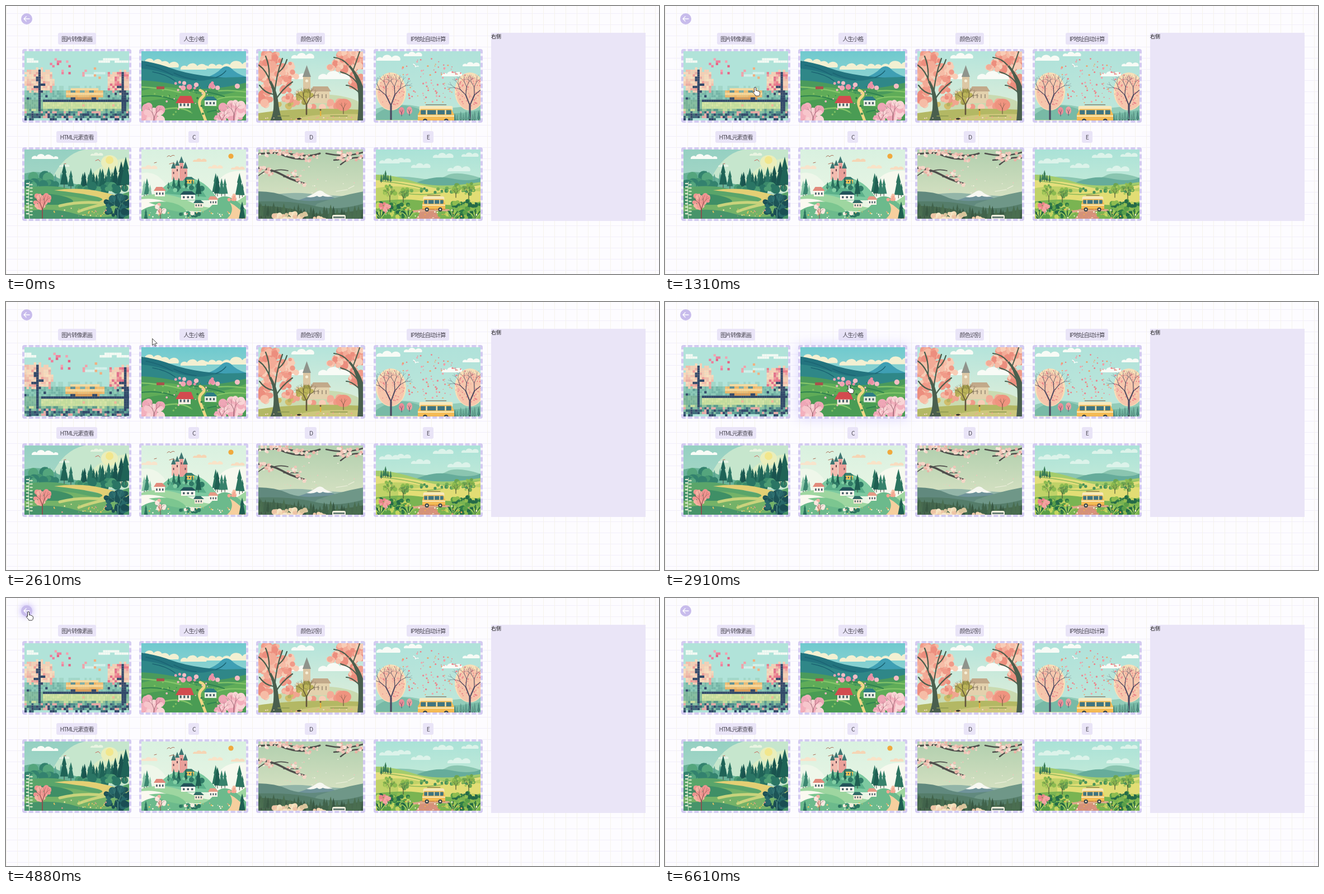
Animation of 1167 by 480 pixels, one loop 6650 ms. Source, as an HTML page:

```html
<!DOCTYPE html>
<html lang="zh">
<head>
<meta charset="utf-8">
<style>
html, body { margin: 0; width: 100%; height: 100%; overflow: hidden; }
#stage {
  position: absolute; left: 0; top: 0; width: 1167px; height: 480px; overflow: hidden;
  background-color: #fdfcff;
  background-image:
    linear-gradient(90deg, #f5f3ec 1px, transparent 1px),
    linear-gradient(#f1eefa 1px, transparent 1px);
  background-size: 20px 20px;
  background-position: 0 13px;
  font-family: "Noto Sans CJK SC", "Noto Sans", sans-serif;
}
#stage > * { position: absolute; }
.tag {
  height: 21px; line-height: 21px; border-radius: 3px; background: #e9e4f7;
  color: #4d4a55; font-size: 10.4px; letter-spacing: -1.2px; text-align: center; white-space: nowrap;
}
.card {
  box-sizing: border-box; width: 195px; height: 132px; overflow: hidden;
  border: 4px dashed #d3cbf1; border-radius: 4px; background: #f6f3fd;
}
.card svg { display: block; width: 187px; height: 124px; }
#panel { left: 867px; top: 48px; width: 276px; height: 337px; background: #eae5f7; color: #111; font-size: 9px; line-height: 13px; }
#back { left: 27px; top: 13px; width: 20px; height: 20px; border-radius: 50%; background: #c8bcec; }
#mouse { left: 0; top: 0; }
</style>
</head>
<body>
<div id="stage">
  <div id="back"><svg width="20" height="20" style="display:block"><path d="M15.5 10H5m4.5-4.5L5 10l4.5 4.5" fill="none" stroke="#fff" stroke-width="1.3"/></svg></div>
  <div id="panel">右侧</div>
</div>
<script>
const LOOP = 6650;
const stage = document.getElementById('stage');
const back = document.getElementById('back');

let seed = 7, out = '', ids = 0;
const rnd = () => (seed = (seed * 16807) % 2147483647) / 2147483647;
const pick = a => a[Math.floor(rnd() * a.length)];
const n1 = v => +v.toFixed(1);

// drawing helpers
const P = (d, f) => out += `<path d="${d}" fill="${f}"/>`;
const L = (d, s, w = 1) => out += `<path d="${d}" fill="none" stroke="${s}" stroke-width="${n1(w)}" stroke-linecap="round"/>`;
const E = (x, y, r, f, ry = r) => out += `<ellipse cx="${n1(x)}" cy="${n1(y)}" rx="${n1(r)}" ry="${n1(ry)}" fill="${f}"/>`;
const R = (x, y, w, h, f, r = 0) => out += `<rect x="${n1(x)}" y="${n1(y)}" width="${n1(w)}" height="${n1(h)}" rx="${r}" fill="${f}"/>`;
const sky = (x, y, a, b) => {
  const id = 'sky' + ids++;
  out += `<linearGradient id="${id}" x2="0" y2="1"><stop stop-color="${a}"/><stop offset="1" stop-color="${b}"/></linearGradient>`;
  R(x, y, 188, 125, `url(#${id})`);
};
const cloud = (x, y, w, f = '#f8fbf6') => {
  const a = (rx, ry, dx, dy) => `a${n1(rx * w)} ${n1(ry * w)} 0 0 1 ${n1(dx * w)} ${n1(dy * w)}`;
  P(`M${x - w / 2} ${y}${a(.15, .13, .25, -.12)}${a(.22, .2, .4, -.02)}${a(.18, .14, .35, .14)}z`, f);
};
const spray = (n, x, y, rx, ry, r, cols) => {
  while (n--) {
    const a = rnd() * 6.283, d = Math.sqrt(rnd());
    E(x + Math.cos(a) * d * rx, y + Math.sin(a) * d * ry, r * (.6 + rnd() * .8), pick(cols));
  }
};
const pine = (x, y, h, f) => {
  P(`M${n1(x)} ${n1(y - h)}l${n1(h * .1)} ${n1(h * .4)}h${n1(-h * .03)}l${n1(h * .1)} ${n1(h * .5)}h${n1(-h * .34)}l${n1(h * .1)} ${n1(-h * .5)}h${n1(-h * .03)}z`, f);
  R(x - .5, y - h * .12, 1, h * .16, '#3c4a40');
};
const pines = (n, x0, x1, y, h, cols) => {
  for (let i = 0; i < n; i++) pine(x0 + (x1 - x0) * (i + rnd() * .6) / n, y + rnd() * 4, h * (.65 + rnd() * .6), pick(cols));
};
const grow = (x, y, len, ang, w, c, n) => {
  const x2 = x + len * Math.sin(ang), y2 = y - len * Math.cos(ang);
  L(`M${n1(x)} ${n1(y)}L${n1(x2)} ${n1(y2)}`, c, w);
  if (n) for (const s of [-.45, .4]) grow(x2, y2, len * .72, ang + s + rnd() * .2 - .1, w * .62, c, n - 1);
};
const tree = (x, y, r, f, c, ry = r) => {
  E(x, y, r, f, ry);
  grow(x, y + ry * 1.3, ry * .75, 0, .9, c, 2);
};
const house = (x, y, w, h, wall, roof) => {
  R(x, y - h, w, h, wall);
  P(`M${x - 2} ${y - h}l${w * .25} ${-h * .7}h${w * .6}l${w * .15 + 4} ${h * .7}z`, roof);
  for (let i = 0; i < 3; i++) R(x + w * (.12 + i * .3), y - h * .7, w * .14, h * .4, '#49606a');
};
const van = (x, y, w, h) => {
  R(x + w * .04, y - h, w * .92, h * .3, '#f7e8bd', 3);
  P(`M${x} ${y - h * .1}v${-h * .38}l${w * .08} ${-h * .34}h${w * .84}l${w * .08} ${h * .34}v${h * .38}z`, '#f4bb55');
  R(x + w * .08, y - h * .75, w * .84, h * .26, '#3f7480', 1);
  for (const k of [.22, .5, .74]) R(x + w * k, y - h * .76, w * .04, h * .28, '#f8dfa0');
  R(x, y - h * .44, w, h * .08, '#fae9b6');
  R(x, y - h * .14, w, h * .05, '#c87b3a');
  for (const k of [.2, .78]) { E(x + w * k, y - h * .1, h * .14, '#33434b'); E(x + w * k, y - h * .1, h * .06, '#e8dcc0'); }
  L(`M${x + w * .22} ${y - h * 1.07}h${w * .56}`, '#6b5844', 1);
};

// square-cell helpers for the first picture
const U = 4.13;
const cell = (i, j, f) => R(33 + i * U, 81 + j * U, U + .1, U + .1, f);
const px = (i, j, w, h, cols, p = 1) => {
  for (let a = 0; a < w; a++) for (let b = 0; b < h; b++) if (rnd() < p) cell(i + a, j + b, pick(cols));
};
const oval = (cx, cy, rx, ry, cols) => {
  for (let i = 0; i < 46; i++) for (let j = 0; j < 30; j++) {
    if (((i - cx) / rx) ** 2 + ((j - cy) / ry) ** 2 < .75 + rnd() * .4) cell(i, j, pick(cols));
  }
};

const pixelPark = () => {
  const navy = '#33496a', white = ['#f4faf4'];
  const peach = ['#f6ceb4', '#f6ceb4', '#f9d9bb', '#f3bcaa'];
  R(33, 81, 188, 125, '#b1e3d9');
  px(1, 3, 3, 1, white); px(1, 4, 5, 1, white); px(34, 3, 7, 1, white); px(39, 4, 6, 1, white); px(32, 4, 5, 1, white);
  px(30, 9, 5, 1, ['#d3f0ea']); px(26, 10, 5, 1, ['#d3f0ea']);
  px(12, 15, 22, 2, ['#a2d6c8', '#b1e3d9']); px(0, 17, 46, 4, ['#80c0ae', '#8cc9b7', '#74b4a6']);
  oval(5.5, 12.5, 7, 5.5, peach); oval(41, 13, 6, 5.5, peach);
  px(0, 9, 12, 9, ['#ef9c98', '#f8e0c0', '#e8aca2'], .18); px(36, 9, 9, 9, ['#ea7d8a', '#f09aa0', '#e2708a'], .34);
  px(11, 2, 10, 8, ['#ee7f9c', '#f3a1b0', '#e56485'], .12); px(20, 7, 13, 6, ['#f2a0a8', '#f0b080'], .05);
  px(0, 17, 12, 4, ['#5f9c94', navy, '#8ecbb4'], .28); px(35, 17, 11, 4, ['#5f9c94', navy, '#8ecbb4'], .28);
  px(0, 21, 46, 5, ['#86bd9e', '#79b298']);
  px(8, 21, 37, 1, [navy]);
  px(8, 22, 35, 3, ['#cde0a0', '#cde0a0', '#d6e4a6', '#c4dc9c']);
  px(14, 23, 26, 1, ['#f0b89a', '#b6d49c'], .15);
  px(0, 25, 46, 1, ['#5a9a8c', '#93c298', '#cde0a0']);
  px(0, 26, 46, 3, ['#4e8a8a', '#5fa394', '#84bea0', '#3c647a', '#e9a8a4']);
  px(0, 27, 46, 3, [navy, navy, '#3d6c78'], .45);
  px(20, 16, 12, 1, ['#f4d9a0']); px(18, 17, 16, 3, ['#f0b566', '#f2be74']);
  px(20, 17, 2, 1, ['#5d8f96']); px(24, 17, 2, 1, ['#7eb0ac']); px(28, 17, 2, 1, ['#5d8f96']);
  px(18, 18, 16, 1, ['#f7d79a']); px(20, 20, 12, 1, ['#d99a58']); px(20, 20, 2, 1, [navy]); px(29, 20, 2, 1, [navy]);
  px(6, 8, 1, 18, [navy]); px(5, 11, 1, 2, [navy]); px(7, 14, 2, 1, [navy]); px(4, 15, 2, 1, [navy]);
  px(42, 9, 1, 18, [navy]); px(43, 18, 1, 8, [navy]); px(40, 15, 2, 1, [navy]);
};

const valley = () => {
  sky(242, 81, '#6fc9ce', '#b9e2d6');
  for (const [x, y, w] of [[258, 104, 40], [285, 110, 46], [335, 114, 46], [370, 112, 34], [414, 112, 56]]) cloud(x, y, w, '#f3f0d2');
  P('M352 130q22-6 34-19q8-6 16 0q10 11 28 16v18z', '#3f9fb4');
  P('M242 98q28 4 52 13t60 14t76 2v50H242z', '#23747f');
  P('M242 112q26 2 60 14t60 6t68-4v40H242z', '#2f8788');
  L('M250 106q24 4 48 18M300 120q20 10 40 12M375 128q12-4 18-12M262 118q24 4 40 16', '#1b6473', 1.4);
  P('M242 133q40 2 78 12t110-8v70H242z', '#4a9a5c');
  P('M242 152q48-14 90 2t98-8v60H242z', '#5fac58');
  P('M242 174q50-16 100 0t88-6v38H242z', '#4a9c54');
  L('M242 145q40 2 70 10M380 152q24-2 50 2M280 186q30-8 50 4M375 168q20-8 55-4', '#83c468', 2.4);
  L('M242 162q30-4 58 6M330 150q30 2 60 12M360 190q20-6 30-2', '#2f8250', 2);
  L('M347 151q12 5 4 12t-4 17t10 26', '#f0d684', 5);
  spray(14, 335, 143, 92, 7, 3.5, ['#f0a4b4', '#e890a6', '#f5bcc4']);
  spray(46, 335, 170, 90, 28, 1.5, ['#2f7d4a', '#3b8a4c', '#f3b8c0', '#81bf62']);
  house(308, 183, 22, 12, '#f6efe2', '#d34b4f'); house(355, 179, 21, 10, '#e6eee2', '#2c7c84');
  P('M303 174l8-13h20l5 13z', '#d34b4f');
  R(269, 144, 14, 5, '#a8524c');
  for (const [x, y, r] of [[264, 194, 22], [407, 188, 23], [385, 200, 11]]) {
    spray(34, x, y, r, r * .72, r * .26, ['#f3b0bd', '#f7c6cc', '#eea6b6', '#f9d5d6']);
    grow(x, y + 18, 13, .05, 1.3, '#8d5664', 3);
  }
};

const church = () => {
  const pinks = ['#f09a88', '#f3ab97', '#ec8e7e', '#f6bca6', '#f8cdb6'], bark = '#4a5f4e';
  sky(451, 81, '#b4e4db', '#e6f0da');
  cloud(530, 94, 40); cloud(588, 131, 60); cloud(515, 131, 46);
  E(560, 184, 80, '#c9dab0', 26);
  R(531, 126, 13, 46, '#dcc7a4'); P('M530 127l7.500-21l7.500 21z', '#8f948c'); E(537.5, 134, 2.6, '#f6efd8');
  R(518, 152, 60, 22, '#e3d1ad'); P('M543 153l6-9h26l6 9z', '#c2a98a');
  for (let i = 0; i < 8; i++) R(522 + i * 7, 158, 2, 7, '#a89880');
  spray(12, 585, 178, 46, 6, 6, pinks); spray(9, 507, 176, 20, 5, 5, ['#b3b160', '#d0bd6a', '#f0a58e']);
  P('M451 192q80-12 187-6v20H451z', '#b3b864');
  P('M510 206q30-16 128-12v14z', '#cdc77c');
  E(603, 177, 14, '#ef937f', 11); grow(603, 193, 9, 0, 1.3, '#7d5c48', 2);
  spray(28, 537, 164, 15, 12, 4, ['#aea856', '#bcb45a', '#9c9848']); grow(537, 194, 17, 0, 2.6, '#62543c', 4);
  spray(60, 466, 118, 20, 34, 6, pinks); spray(36, 501, 126, 18, 26, 5, pinks); spray(18, 462, 165, 12, 14, 6, pinks);
  spray(16, 505, 165, 12, 6, 4, pinks); spray(24, 474, 94, 18, 10, 5, pinks);
  spray(70, 615, 98, 26, 20, 6, pinks); spray(14, 586, 108, 12, 8, 4, pinks); spray(18, 628, 138, 12, 16, 6, pinks);
  P('M472 206q8-16 6-40q-1-18-8-30l4-2q10 18 12 34q2 22 8 38z', bark); P('M628 206q4-36 0-62q-4-22-16-36l3-2q16 18 23 38v62z', bark);
  L('M472 136q-6-20-20-30M480 160q2-34 14-66M482 168q12-20 30-32M470 130q2-20-6-40M477 158q-14-2-24-16M488 118q10-8 14-22', bark, 2.2);
  L('M630 142q-10-18-32-24M620 116q6-16 12-34M612 106q-10-12-26-14M632 156q-14-14-24-14', bark, 2);
  R(561, 188, 2.4, 9, '#e4b23e'); E(562, 186, 1.5, '#6b4b3a');
  E(524, 202, 4, '#2e2d2b', 1.6); L('M486 197h20M580 197h30', '#8d9a50', 1.6);
  spray(18, 545, 201, 90, 3, 1, ['#f6d7c0', '#f0a58e']);
};

const petals = () => {
  const bark = '#4b4860';
  sky(660, 81, '#b0e2da', '#bfe7da');
  cloud(682, 98, 42); cloud(726, 90, 32); cloud(796, 126, 36); cloud(830, 108, 30);
  P('M660 184q40-12 76-4t112-4v30H660z', '#92ccb9'); P('M660 194q34-26 76-10t112 2v20H660z', '#78baa6');
  for (const x of [687, 828]) {
    E(x, 153, 27, '#f8dfb8', 34); E(x, 156, 24, '#f6c6ac', 30);
    spray(110, x, 150, 24, 30, 1.1, ['#ee9a94', '#f7d8b4', '#f2a596', '#ea858a']);
    grow(x, 206, 28, 0, 3.2, bark, 5);
  }
  tree(706, 188, 5, '#ec8d98', bark, 7); tree(720, 187, 5, '#f0a0a2', bark, 7);
  pines(9, 798, 846, 204, 18, ['#4c8a80', '#5f9c8c']);
  spray(95, 757, 134, 60, 42, 1.2, ['#ef7f86', '#f0a06a', '#f2a0a8', '#e9858f']);
  L('M727 104q3 1 4 5q3-2 5-1', '#fbfdfa', 1.4);
  van(735, 209, 65, 30); R(660, 204, 75, 2, '#cfdfa4');
};

const woods = () => {
  const dark = ['#1f6357', '#2b7464', '#1a544f'];
  sky(33, 257, '#95d0c2', '#b7dfcb');
  P('M82 310q24-53 74-55h64v80H82z', '#c6e6cd'); P('M136 322q30-46 84-50v60h-84z', '#d9ecc6');
  E(185, 280, 15, '#eaeebb', 13); E(185, 276, 7, '#f2e68c');
  cloud(64, 274, 36); cloud(82, 274, 22); cloud(104, 288, 18, '#e4f1e4'); cloud(162, 268, 22, '#e9f4e2');
  P('M33 300q30-8 60 8t80 14v30H33z', '#68b298');
  pines(9, 36, 112, 316, 18, ['#5ba591', '#4b9683']);
  pines(13, 134, 204, 324, 32, dark);
  spray(24, 62, 316, 32, 11, 8, ['#33826e', '#459672', '#54a57d']); spray(30, 172, 328, 48, 7, 6, ['#2a7564', '#3c8b6c', '#4c9c74']);
  P('M33 326q60-10 100 8t88-2v56H33z', '#5aa56a'); P('M86 330q46-6 86 3t50 14q-30 8-60 4q40-8-76-21z', '#e3cf74');
  P('M33 352q50-20 100-8t88 8v32H33z', '#74b268'); P('M33 340q44-8 74 2t-10 14H33z', '#3f8f66');
  L('M96 358q40-10 84-4q-30 6-50 14', '#c9d37c', 5);
  P('M33 368q50-8 90 4t98 0v14H33z', '#47946a');
  pine(104, 324, 42, dark[0]); pine(116, 326, 32, dark[1]); pine(206, 326, 48, dark[2]); pine(214, 326, 56, dark[0]);
  spray(46, 200, 358, 23, 20, 5, ['#1d5457', '#28686a', '#1a4e54']); grow(200, 384, 17, 0, 1.3, '#5d9c8c', 4);
  spray(40, 65, 350, 14, 14, 3.6, ['#f2a196', '#ee9490', '#f5b3a4']); grow(65, 380, 16, 0, 1.8, '#8c4c4c', 3);
  L('M42 381q-4-30 0-66', '#eaf1d6', .9);
  for (let y = 318; y < 374; y += 6) { E(38.5, y, 3, '#e3eed2', 1.2); E(45, y + 2, 3, '#cfe4c0', 1.2); }
  spray(26, 130, 370, 60, 8, 1, ['#f3c65c', '#f6e5a6', '#ef9c8c']);
  L('M160 277l5-2l3 3M104 283l3-1', '#c9675c', 1);
};

const castle = () => {
  const dark = ['#1f5f52', '#2c7460', '#37826c'];
  sky(242, 257, '#d9f1e0', '#eff7e6');
  P('M360 350q16-50 48-54t24 4v60z', '#f6f9ee'); P('M242 300q30-8 50 30t-10 30h-40z', '#eff7ea');
  cloud(346, 279, 24, '#f6d5b4'); cloud(374, 291, 26, '#f9e3c8'); cloud(256, 292, 28, '#f8e4cc'); cloud(414, 293, 24, '#f8dcc0');
  E(402, 269, 4.6, '#f0a93e');
  P('M262 348q22-36 56-40t62 40z', '#7cc9a0'); P('M284 336q22-24 36-28t38 34z', '#5bb08a');
  for (const [x, y, w, h] of [[296, 291, 7, 20], [303, 286, 6, 26], [310, 281, 7, 32], [317, 291, 7, 20]]) {
    R(x, y, w, h, x > 306 ? '#e9a09a' : '#f3bcb0'); P(`M${x - 1} ${y}l${w / 2 + 1} ${-w * 1.7}l${w / 2 + 1} ${w * 1.7}z`, '#3f7672');
    R(x + w / 2 - 1, y + 6, 2, 4, '#694b55');
  }
  house(320, 318, 16, 7, '#f2c45c', '#3a7f72');
  pines(6, 288, 350, 326, 20, dark); pines(4, 372, 394, 336, 32, dark); pines(2, 416, 428, 340, 36, dark);
  pines(3, 244, 262, 340, 26, ['#8cc8aa', '#3b8670']); spray(14, 318, 325, 36, 6, 4, ['#4b9f80', '#82cfa4', '#2f7a66']);
  P('M242 342q40-14 90 10t98-14v46H242z', '#9ed6a0'); P('M242 346q34-4 62 14t126-4v28H242z', '#fbf9f0');
  P('M242 366q30-18 70-2t60-12t58 14v18H242z', '#6cba8c'); P('M255 352q40-6 60 8t-20 6z', '#7cc690');
  house(266, 341, 18, 10, '#fbf5ea', '#e28a7c'); house(313, 347, 25, 9, '#fdf9f0', '#23535a'); house(337, 361, 15, 8, '#f7e8d6', '#2f6a66'); house(363, 356, 15, 9, '#fbf5ea', '#e59a86');
  P('M394 382q16-14 6-30q20 10 30 30z', '#f6cf9e');
  spray(14, 276, 363, 10, 8, 3, ['#f8e9e0', '#f2b3a6']); grow(276, 381, 8, 0, 1, '#7a4d4a', 3);
  spray(12, 328, 374, 20, 4, 3, ['#2c7460', '#3f8f70', '#f6efe0']); spray(9, 404, 344, 7, 6, 3, ['#f4a792', '#f6c2a8']);
  pine(422, 384, 34, dark[0]); pine(250, 383, 20, dark[1]); pine(344, 340, 32, dark[0]);
  spray(30, 335, 373, 90, 8, 1, ['#f3a090', '#fff6e6', '#f0bd58']);
  L('M288 270q4-4 6 0q4-4 7-2M292 283l6-2l4 2M265 281l4-1', '#ab6a52', 1);
};

const blossom = () => {
  const bark = '#4f4e4c';
  sky(451, 257, '#b1cfae', '#e4e8ca');
  P('M451 342q50-10 90-6t98 6v20H451z', '#93b5a8');
  P('M506 352q34-8 48-18q6-4 12 0q18 12 56 18z', '#6f939a'); P('M537 342q12-5 19-10q5-3 10 0q6 6 18 9q-12 2-18-1q-6 4-10 0q-8 4-19 2z', '#f7f8f2');
  P('M451 332q30 0 52 10t60 6t76-2v38H451z', '#61897e'); P('M556 354q40-14 84-22v40H540z', '#6f9788');
  P('M451 350q60-2 100 8t88-4v28H451z', '#557d6a');
  P('M451 358q40 0 80 10t108-4v20H451z', '#48694f');
  pines(16, 451, 530, 376, 24, ['#41634b', '#4a6e50', '#395843']); pines(18, 530, 640, 382, 22, ['#41634b', '#4a6e50', '#395843']);
  spray(46, 510, 378, 32, 8, 3.6, ['#f2d9b4', '#eec5a6', '#f6e6c6', '#d8c49c']); spray(12, 560, 383, 18, 4, 3, ['#eec5a6', '#f2d9b4']);
  R(583, 374, 24, 10, '#f0eedc', 3); R(585, 377, 20, 3, '#6a8078');
  L('M451 265q36-4 64 1t46-2M488 264q18 10 46 10', bark, 3); L('M451 290q24 2 42 12t40 16', bark, 3.6);
  L('M474 297q14-6 30-2M496 306q16 0 26 0M451 304q10-8 18-10', bark, 1.6);
  L('M638 262q-30 10-66 2M638 272q-22-4-40 12M612 266q-12 10-26 10', bark, 2.4);
  for (const [x, y, rx, ry, n] of [[482, 263, 32, 7, 32], [535, 270, 26, 8, 20], [464, 296, 14, 9, 18], [515, 303, 18, 9, 14], [612, 268, 26, 10, 30], [530, 318, 6, 4, 5]])
    spray(n, x, y, rx, ry, 2.4, ['#f0c5b8', '#f4d5c6', '#eab3a6', '#f9e4d8']);
  spray(24, 550, 305, 80, 30, .8, ['#f4c3bb', '#fbf3e6']);
  L('M590 332l20-3M612 327l10-5', '#eef0dd', 1.2);
};

const meadow = () => {
  const leaf = ['#2f7a48', '#5a9f48', '#256a48', '#8fbd50', '#c4d460'];
  sky(660, 257, '#aae2d7', '#d9f1da');
  for (const [x, y, w] of [[684, 282, 36], [706, 280, 32], [780, 272, 36], [828, 270, 30], [740, 290, 34], [808, 296, 40]]) cloud(x, y, w, '#dcf3ea');
  P('M660 310q40-8 74-2t52-4t62 4v26H660z', '#8ac5b0'); P('M728 318q36-16 68-9t52-2v26H728z', '#66ac9b');
  P('M660 302q30 0 70 13t118 0v66H660z', '#a3cc6c'); P('M660 312q50 0 96 12t92-6v60H660z', '#e4de7c');
  P('M660 326q50-8 90 6t98-8v54H660z', '#c0d268'); P('M700 338q60-12 148-6v44H700z', '#e2dd74');
  P('M660 350q60-8 100 2t88-2v36H660z', '#7ab452');
  L('M672 314q40 4 70 12M780 328q30-2 66-8M716 336q30 4 64-2', '#8cb95a', 1.6);
  pines(5, 668, 690, 312, 17, ['#3a7c58', '#2d6b50']); spray(22, 775, 330, 60, 4, 2.6, ['#4a925a', '#74ae58']);
  for (const [x, y, r] of [[685, 331, 11], [709, 334, 9], [803, 327, 7], [826, 327, 11]]) {
    spray(20, x, y, r, r, 2.8, ['#8dbb50', '#a9c85c', '#6da550']); grow(x, y + r + 9, r * .9, 0, 1.2, '#4a5a3a', 3);
  }
  spray(30, 692, 358, 32, 6, 3.5, leaf); spray(26, 822, 356, 26, 7, 3.5, leaf);
  P('M738 364q14-2 30 0q-2 8 8 18h-46q10-8 8-18z', '#d5927a'); L('M728 368q40-4 62-2', '#dea98c', 4);
  van(743, 367, 41, 26);
  spray(44, 688, 374, 28, 8, 3.5, leaf); spray(44, 816, 373, 32, 8, 3.5, leaf);
  for (const x of [668, 718, 798, 838]) for (let k = -3; k < 4; k++) L(`M${x} 382q${k * 2}-10 ${k * 4}-${18 - Math.abs(k) * 2}`, k % 2 ? '#a4cf62' : '#1f5f42', 1.5);
  spray(18, 674, 360, 11, 6, 3, ['#f3a2a0', '#f6bdb2', '#e98488']);
  spray(36, 755, 372, 90, 9, 1.1, ['#f7f3d8', '#f3b04e', '#f0908c']);
};

const cards = [
  ['图片转像素画', 68, pixelPark], ['人生小格', 51, valley], ['颜色识别', 51, church], ['IP地址自动计算', 76, petals],
  ['HTML元素查看', 73, woods], ['C', 19, castle], ['D', 21, blossom], ['E', 19, meadow]
].map(([name, w, draw], k) => {
  const x = 29 + (k % 4) * 209.2, y = k < 4 ? 77 : 253, left = x + 97.5 - w / 2;
  out = '';
  draw();
  const tag = document.createElement('div'), card = document.createElement('div');
  tag.className = 'tag';
  tag.textContent = name;
  tag.style.cssText = `left:${left}px;top:${y - 29}px;width:${w}px`;
  card.className = 'card';
  card.style.cssText = `left:${x}px;top:${y}px`;
  card.innerHTML = `<svg viewBox="${Math.floor(x + 4)} ${y + 4} 187 124">${out}</svg>`;
  stage.append(tag, card);
  return { card, pic: card.firstChild, left, top: y - 29, w };
});

stage.insertAdjacentHTML('beforeend', `<svg id="mouse" width="1167" height="480">
  <g><path d="M-1.500 1q0-1.500 1.500-1.500t1.500 1.500v4.500q2.500-.5 3 .8q2.300-.2 2.500 1.200q1.500.2 1.500 1.800v1.500q0 3-2 4.200h-5.500q-1-2.500-4.500-5.700q-.8-1.500.8-1.800l1.200 1z" fill="#fff" stroke="#222" stroke-width=".9"/></g>
  <g><path d="M-2-5q2 0 2 1q0-1 2-1M0-4V4M-2 5q2 0 2-1q0 1 2 1" fill="none" stroke="#333"/></g>
  <g><path d="M0 0v12l2.800-2.600l2 4.400l1.900-.9l-2-4.200h3.900z" fill="#fff" stroke="#222" stroke-width=".8"/></g></svg>`);
const mouse = document.getElementById('mouse');
const shapes = [...mouse.children];

// pointer path: time, x, y
const path = [
  [1040, 205, -20], [1270, 180, 72], [1310, 161, 146], [2190, 161, 142], [2330, 190, 77], [2560, 250, 62],
  [2780, 300, 77], [2910, 329, 149], [3060, 320, 120], [3150, 290, 76], [3500, 150, 56], [3710, 118, 53],
  [4200, 118, 53], [4620, 46, 34], [4880, 40, 25], [5100, 40, 25], [5440, 860, 70], [5760, 1190, 150]
];
const hovers = [[0, 1285, 2330], [1, 2780, 3150]];
const onBack = [4630, 5105];

const clamp = v => Math.min(1, Math.max(0, v));
const ease = v => v * v * (3 - 2 * v);
const level = (t, a, b, d) => ease(clamp((t - a) / d)) - ease(clamp((t - b) / d));

function pointer(t) {
  let i = 1;
  while (i < path.length - 1 && path[i][0] < t) i++;
  const a = path[i - 1], b = path[i], k = clamp((t - a[0]) / (b[0] - a[0]));
  return [a[1] + (b[1] - a[1]) * k, a[2] + (b[2] - a[2]) * k];
}

function render(t) {
  for (const [k, a, b] of hovers) {
    cards[k].pic.style.transform = `scale(${1 + .1 * level(t, a, b, 600)})`;
    cards[k].card.style.boxShadow = `0 0 22px rgba(190,180,255,${.65 * level(t, a, b, 200)})`;
  }
  back.style.boxShadow = `0 0 12px rgba(175,155,245,${.85 * level(t, ...onBack, 200)})`;
  const [x, y] = pointer(t);
  const inside = ([a, b]) => t >= a && t < b;
  const hand = inside(onBack) || hovers.some(h => inside(h.slice(1)));
  const text = cards.some(c => x > c.left && x < c.left + c.w && y > c.top && y < c.top + 21);
  const kind = hand ? 0 : text ? 1 : 2;
  shapes.forEach((g, i) => {
    g.setAttribute('display', i === kind ? 'inline' : 'none');
    g.setAttribute('transform', `translate(${n1(x)} ${n1(y)})`);
  });
}

const start = performance.now();
function tick() {
  render((performance.now() - start) % LOOP);
  requestAnimationFrame(tick);
}
tick();
</script>
</body>
</html>
```
